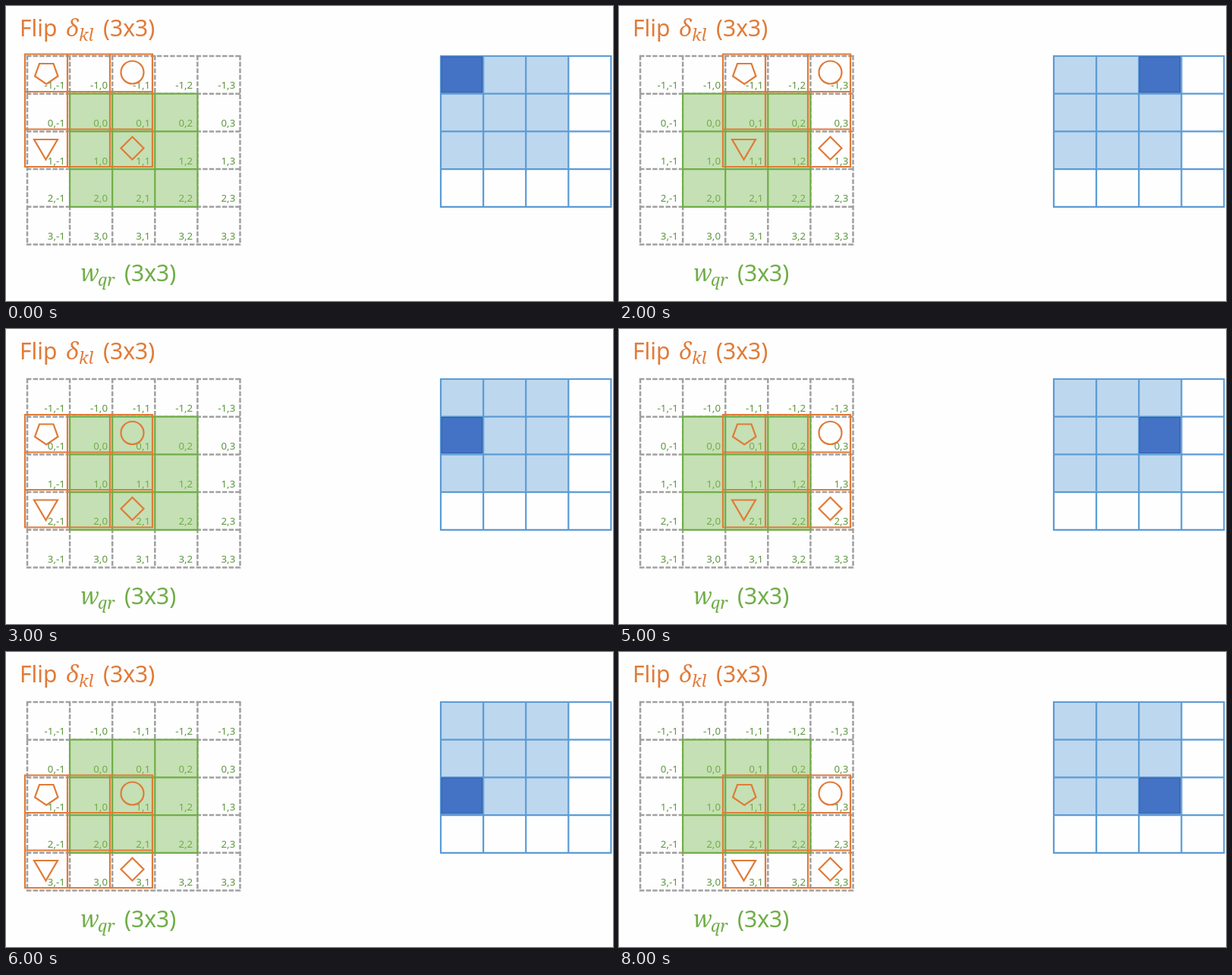
Write an HTML page that moves like this. It is 800 px wide and 389 px high and loops after 9000 ms.

```html
<!DOCTYPE html>
<html lang="en">
<head>
<meta charset="utf-8">
<title>Flipped kernel sliding over a padded grid</title>
<style>
  html, body { margin: 0; width: 100%; height: 100%; overflow: hidden; background: #fefefe; }
  svg { display: block; }
  path, circle { fill: none; stroke-width: 2.2; }
  text { font-family: "Noto Sans", "Open Sans", sans-serif; font-size: 30px; }
  .label { font-size: 13.3px; text-anchor: end; }
  .inner { fill: #70ad47; }
  .outer { fill: #5c9640; }
  .math { font-family: "Noto Serif", serif; font-style: italic; font-weight: 500; }
  .sub { font-size: 22px; }
  .orange { stroke: #e07b39; }
  .orangeText { fill: #e07b39; }
  .greenText { fill: #70ad47; }
  #padding { stroke: #a0a0a0; stroke-width: 2.5; stroke-dasharray: 6.4 2.2; }
</style>
</head>
<body>
<svg width="800" height="389" viewBox="0 0 800 389">
  <g class="orangeText">
    <text x="18" y="40">Flip</text>
    <text class="math" x="79" y="40">δ</text>
    <text class="math sub" x="96" y="46">kl</text>
    <text x="128" y="40">(3x3)</text>
  </g>
  <g class="greenText">
    <text class="math" x="98" y="363">w</text>
    <text class="math sub" x="121" y="369">qr</text>
    <text x="156" y="363">(3x3)</text>
  </g>
  <path id="padding"/>
  <rect x="84.1" y="115.7" width="168.3" height="149.1" fill="#c5e0b4"/>
  <path id="input" stroke="#70ad47"/>
  <g id="labels"></g>
  <g id="kernel" class="orange">
    <path id="kernelGrid"/>
    <path d="M44 76H62.5L68.5 92.5L53.2 103L38 92.5Z"/>
    <circle cx="166.5" cy="87.5" r="15"/>
    <path d="M37 176H68L52.5 202.5Z"/>
    <path d="M166.5 172.5L181.5 187.5L166.5 202.5L151.5 187.5Z"/>
  </g>
  <rect x="573" y="66" width="168.3" height="149.1" fill="#bdd7ee"/>
  <path id="output" stroke="#5b9bd5"/>
  <rect id="active" x="574" y="67" width="53.5" height="47" fill="#4472c4" stroke="#305ab0"/>
</svg>
<script>
const CELL_W = 56.1, CELL_H = 49.7;
const KERNEL_W = 56, KERNEL_H = 49.5;
const STEP_MS = 1000;
const byId = id => document.getElementById(id);

function drawGrid(id, x, y, n, w = CELL_W, h = CELL_H) {
  let d = "";
  for (let i = 0; i <= n; i++) {
    d += `M${x - 1} ${y + i * h}h${n * w + 2}`;
    d += `M${x + i * w} ${y - 1}v${n * h + 2}`;
  }
  byId(id).setAttribute("d", d);
}

drawGrid("padding", 28, 66, 5);
drawGrid("input", 84.1, 115.7, 3);
drawGrid("kernelGrid", 25, 63.5, 3, KERNEL_W, KERNEL_H);
drawGrid("output", 573, 66, 4);

const inInput = i => i >= 0 && i < 3;
let labels = "";
for (let row = -1; row < 4; row++)
  for (let col = -1; col < 4; col++) {
    const kind = inInput(row) && inInput(col) ? "inner" : "outer";
    labels += `<text class="label ${kind}" x="${134 + col * CELL_W}" y="${159 + row * CELL_H}">${row},${col}</text>`;
  }
byId("labels").innerHTML = labels;

function draw(time) {
  const step = Math.floor(time / STEP_MS) % 9;
  const move = `translate(${step % 3 * KERNEL_W} ${Math.floor(step / 3) * KERNEL_H})`;
  byId("kernel").setAttribute("transform", move);
  byId("active").setAttribute("transform", move);
}

const start = performance.now();
function tick() {
  draw(performance.now() - start);
  requestAnimationFrame(tick);
}
tick();
</script>
</body>
</html>
```
